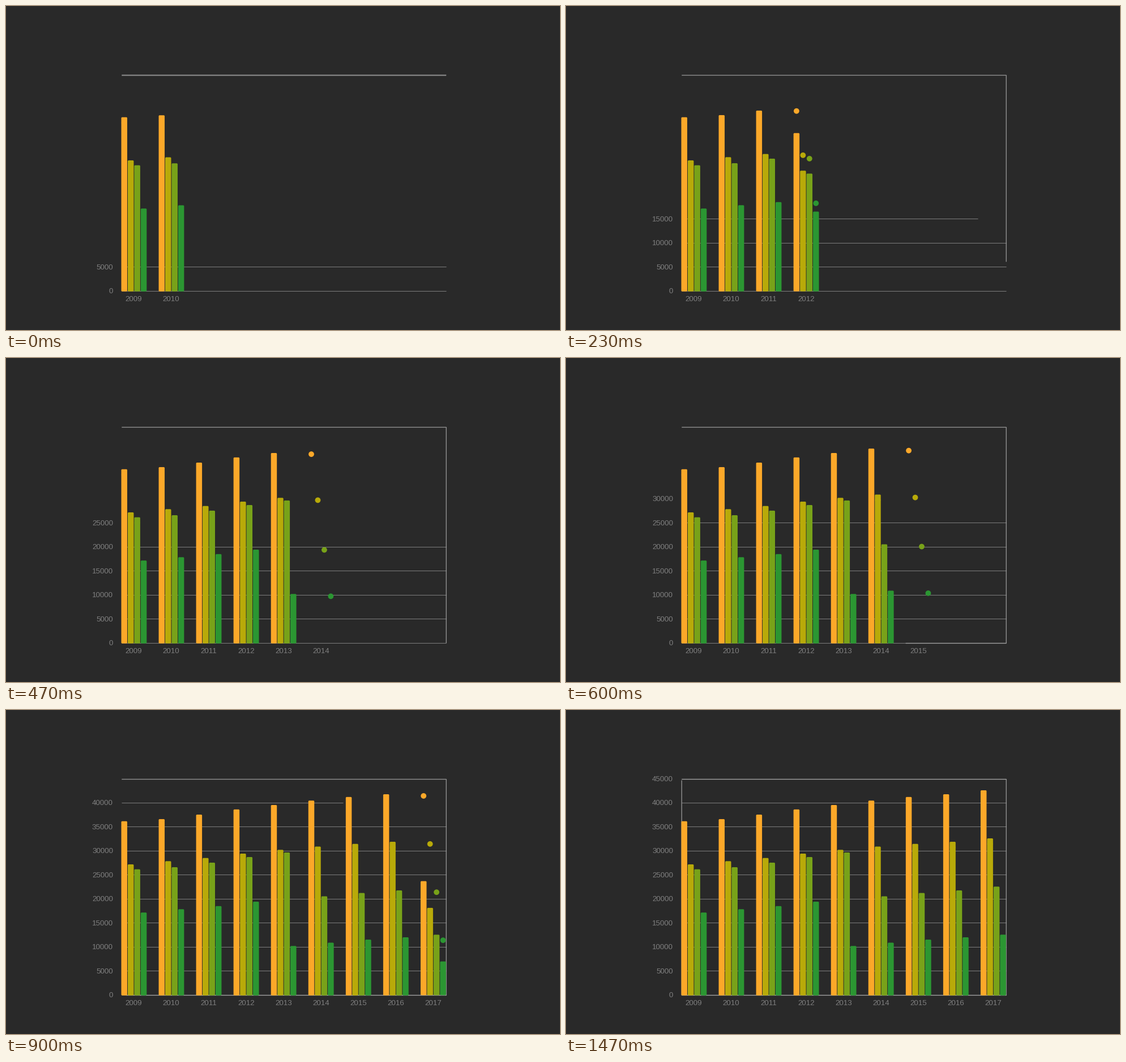
A matplotlib script that plays this animation: 978 by 573 pixels, repeating every 2760 ms.

```python
import numpy as np
import matplotlib.pyplot as plt
from matplotlib.animation import FuncAnimation
from matplotlib.collections import PolyCollection

W, H, DPI = 978, 573, 100
PX = 72 / DPI                      # points per pixel
LOOP_MS, TICK_MS, STEP_MS = 2760, 10, 100 / 3

LEFT, RIGHT, TOP, BASE = 204.3, 777.2, 122, 504
MAX_VALUE = 45000
YEARS = np.arange(2009, 2018)
GROUP_W, BAR_PITCH, BAR_W = 66.05, 11.45, 10.5
BAR_X = 203.5

BACK, GRID, TEXT, FRAME = "#292929", "#7c7c7c", "#7e7e7e", "#b4b4b4"
COLORS = ["#fca829", "#b8aa09", "#78a219", "#2b9632"]
SERIES = np.array([
    [36200, 36640, 37580, 38660, 39580, 40500, 41250, 41820, 42640],
    [27210, 27880, 28540, 29450, 30240, 30920, 31480, 31920, 32630],
    [26190, 26620, 27570, 28740, 29690, 20560, 21250, 21790, 22580],
    [17180, 17870, 18520, 19440, 10210, 10900, 11540, 12020, 12570],
])

# Timing, in steps of 1/30 s
STAGGER = 4.106
LABEL_AT, DOT_AT, DOT_LEN = 4.3, 4.3, 1.0
LINE_AT, LINE_LEN = 5.83, 2.57
BAR_AT, BAR_LEN = 5.97, 2.72
SIDE_AT, SIDE_LEN = -15.0, 15.8


def ease(t):
    """Quartic ease-out, clipped to 0..1."""
    return 1 - (1 - np.clip(t, 0, 1)) ** 4


def phase(step, index):
    """Local time of the index-th year or tick."""
    return step - STAGGER * (index - 3)


def bar_shape(x, top, bottom):
    """Bar outline with slightly cut corners."""
    c = min(1.1, max(bottom - top, 0) / 2)
    r = x + BAR_W
    return [(x + c, top), (r - c, top), (r, top + c), (r, bottom - c),
            (r - c, bottom), (x + c, bottom), (x, bottom - c), (x, top + c)]


# the small margin keeps the pixel size from rounding down
fig = plt.figure(figsize=((W + 0.01) / DPI, (H + 0.01) / DPI), dpi=DPI,
                 facecolor=BACK)
ax = fig.add_axes([0, 0, 1, 1])
ax.set_xlim(0, W)
ax.set_ylim(H, 0)
ax.axis("off")

font = dict(family="Liberation Sans", size=13.4 * PX, color=TEXT, va="baseline")
ticks = np.arange(0, MAX_VALUE + 1, 5000)
tick_y = BASE - ticks / MAX_VALUE * (BASE - TOP)
tick_text = [ax.text(189, y + 4, str(v), ha="right", **font)
             for v, y in zip(ticks, tick_y)]
year_text = [ax.text(225.6 + GROUP_W * i, 522, str(v), ha="center", **font)
             for i, v in enumerate(YEARS)]

grid = [ax.plot([], [], color=GRID, lw=PX, solid_capstyle="butt", zorder=1)[0]
        for _ in ticks]
frame_line, = ax.plot([], [], color=FRAME, alpha=0.75, lw=1.4 * PX, zorder=2,
                      solid_capstyle="butt", solid_joinstyle="miter", snap=False)

index = np.tile(np.arange(len(YEARS)), len(SERIES))
row = np.repeat(np.arange(len(SERIES)), len(YEARS))
bar_x = BAR_X + GROUP_W * index + BAR_PITCH * row
bar_h = SERIES.ravel() / MAX_VALUE * (BASE - TOP)
bar_colors = [COLORS[r] for r in row]

bars = PolyCollection([], facecolors=bar_colors, linewidths=0, zorder=3)
ax.add_collection(bars, autolim=False)
dots = ax.scatter(bar_x + BAR_W / 2, BASE - bar_h + 9.9, s=np.zeros(len(bar_x)),
                  c=bar_colors, linewidths=0, zorder=4)

corners = np.array([(LEFT, TOP + 0.5), (RIGHT, TOP + 0.5),
                    (RIGHT, BASE + 0.5), (LEFT, BASE + 0.5), (LEFT, TOP + 0.5)])


def draw_frame(step):
    points = [corners[0]]
    for side in range(4):
        part = ease((step - SIDE_AT - side * SIDE_LEN) / SIDE_LEN)
        if part <= 0:
            break
        points.append(corners[side] + (corners[side + 1] - corners[side]) * part)
    xs, ys = zip(*points)
    frame_line.set_data(xs, ys)
    # the lone first side is a little heavier
    frame_line.set_linewidth((2 if len(points) == 2 else 1.4) * PX)


def draw_grid(step):
    for i, (line, y) in enumerate(zip(grid, tick_y)):
        part = ease((phase(step, i) - LINE_AT) / LINE_LEN)
        row_y = np.floor(y) + 0.5
        line.set_data([LEFT, LEFT + (RIGHT - LEFT) * part], [row_y, row_y])
        line.set_visible(part > 0)


def draw_bars(step):
    local = phase(step, index)
    part = ease((local - BAR_AT) / BAR_LEN)
    bars.set_verts([bar_shape(x, BASE - h * p, BASE + 0.8 * p)
                    for x, h, p in zip(bar_x, bar_h, part)])
    size = ease((local - DOT_AT) / DOT_LEN)
    dots.set_sizes((9.8 * PX * size) ** 2)


def update(n):
    step = int((n * TICK_MS + 5) / STEP_MS)
    draw_frame(step)
    draw_grid(step)
    draw_bars(step)
    for labels in (tick_text, year_text):
        for i, label in enumerate(labels):
            label.set_visible(phase(step, i) >= LABEL_AT)
    return []


anim = FuncAnimation(fig, update, frames=LOOP_MS // TICK_MS, interval=TICK_MS,
                     repeat=True, repeat_delay=0, cache_frame_data=False)
plt.show()
```
